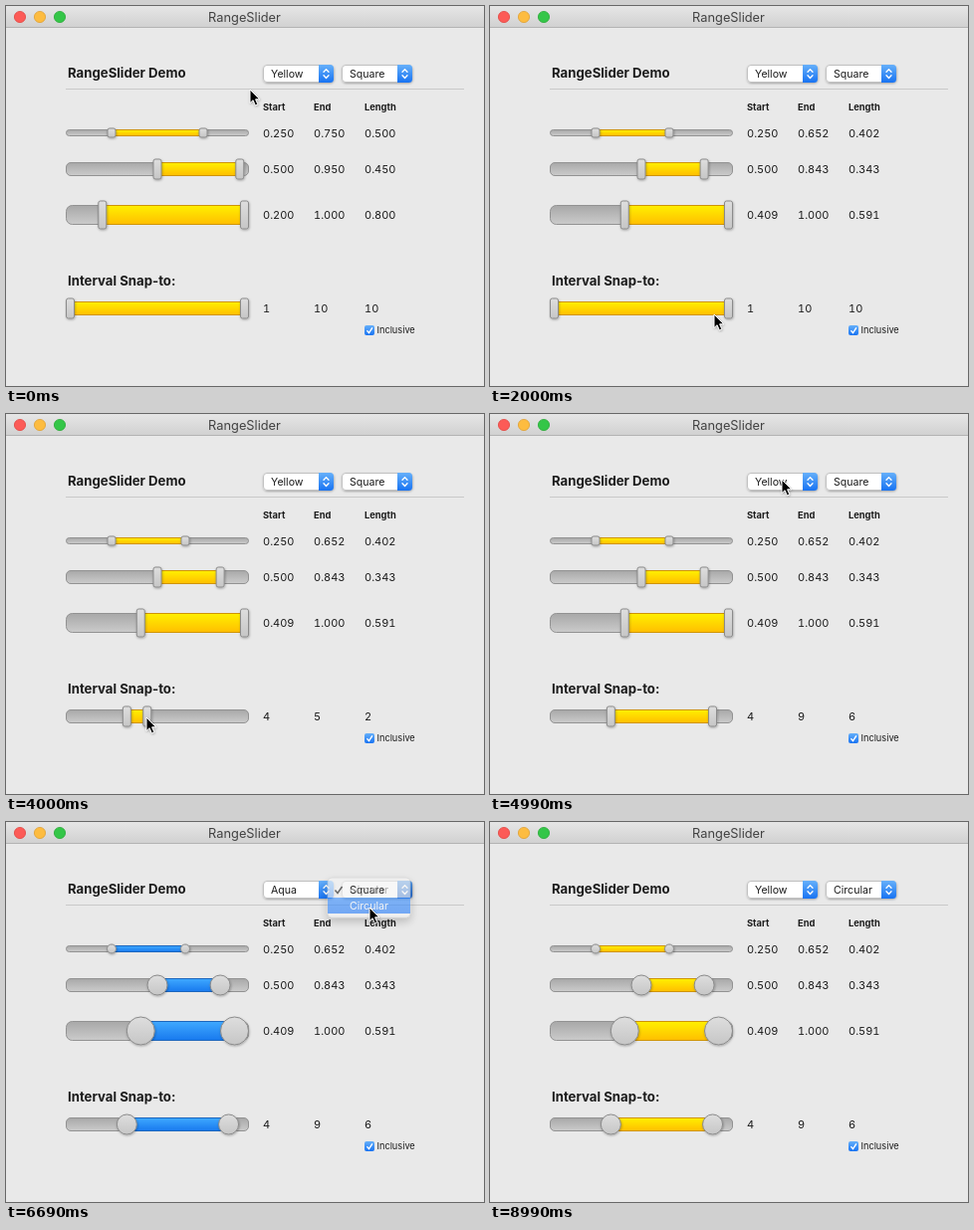
Write an HTML page that moves like this. It is 480 by 382 pixels and loops after 9090 ms.

```html
<!DOCTYPE html>
<html lang="en">
<head>
<meta charset="utf-8">
<title>RangeSlider</title>
<style>
html, body { margin: 0; width: 100%; height: 100%; overflow: hidden; background: #e9e9e9; }
svg { display: block; width: 480px; height: 382px; }
text { font: 11px Inter, "Open Sans", sans-serif; fill: #1c1c1c; }
.title { font-size: 12.8px; fill: #424242; text-anchor: middle; }
.head { font-size: 13.2px; font-weight: 700; }
.col { font-size: 9.3px; font-weight: 700; }
.num { font-variant-numeric: tabular-nums; }
.pick { font-size: 10.6px; }
.small { font-size: 9.2px; }
</style>
</head>
<body>
<svg id="stage" viewBox="0 0 480 382">
  <defs id="defs">
    <filter id="soft" x="-30%" y="-30%" width="160%" height="180%">
      <feDropShadow dx="0" dy="4" stdDeviation="4" flood-opacity=".3"/>
    </filter>
    <filter id="drop" x="-40%" y="-40%" width="180%" height="180%">
      <feDropShadow dx="0.5" dy="1" stdDeviation="0.8" flood-opacity=".3"/>
    </filter>
  </defs>
</svg>
<script>
const LOOP = 9090, STEP = 100;
const stage = document.getElementById('stage');

function el(tag, attrs, parent = stage, text) {
  const node = document.createElementNS('http://www.w3.org/2000/svg', tag);
  set(node, attrs);
  if (text !== undefined) node.textContent = text;
  parent.appendChild(node);
  return node;
}
function set(node, attrs) {
  for (const key in attrs) node.setAttribute(key, attrs[key]);
}
function box(x, y, width, height, fill, more = {}, parent = stage) {
  return el('rect', { x, y, width, height, fill, ...more }, parent);
}
function label(x, y, cls, text, parent = stage) {
  return el('text', { x, y, class: cls }, parent, text);
}
function gradient(id, top, bottom) {
  const g = el('linearGradient', { id, x1: 0, y1: 0, x2: 0, y2: 1 }, document.getElementById('defs'));
  el('stop', { offset: 0, 'stop-color': top }, g);
  el('stop', { offset: 1, 'stop-color': bottom }, g);
}

gradient('bar', '#e6e6e6', '#d1d1d1');
gradient('track', '#a8a8a8', '#cbcbcb');
gradient('Yellow', '#fff000', '#ffbe00');
gradient('Aqua', '#3fa9ff', '#1879ee');
gradient('knob', '#dedede', '#c6c6c6');
gradient('blue', '#66b0fa', '#1873f2');
gradient('pressed', '#4a93e2', '#1259c4');
gradient('hover', '#4596fd', '#3485fa');

// Window
box(0, 0, 480, 382, '#e9e9e9');
box(0, 0, 480, 21, 'url(#bar)');
box(0, 21, 480, 1, '#b3b3b3');
[['#fc5b57', '#e2443f'], ['#fdbc40', '#e0a032'], ['#34c648', '#27aa35']].forEach(([fill, stroke], i) =>
  el('circle', { cx: 14 + 20 * i, cy: 11, r: 5.6, fill, stroke, 'stroke-width': 0.8 }));
label(239.5, 15.5, 'title', 'RangeSlider');
label(62, 72, 'head', 'RangeSlider Demo');
label(62, 281, 'head', 'Interval Snap-to:');
box(60, 83, 400, 1, '#c9c9c9');
['Start', 'End', 'Length'].forEach((name, i) => label(258 + 51 * i, 105, 'col', name));

// Check box
box(360, 321, 10, 10, 'url(#blue)', { rx: 2 });
el('path', { d: 'M362.5 326.3l2 2.3 3.4-5.2', fill: 'none', stroke: '#fff', 'stroke-width': 1.4 });
label(372.5, 329.2, 'small', 'Inclusive');

// Pop-up buttons
function popup(x) {
  box(x + 0.5, 59.5, 70, 17, '#fff', { rx: 3.5, stroke: '#c2c2c2', filter: 'url(#drop)' });
  const end = `M${x + 56} 59h11.5a3.5 3.5 0 0 1 3.5 3.5v11a3.5 3.5 0 0 1-3.5 3.5h-11.5z`;
  const button = el('path', { d: end, fill: 'url(#blue)' });
  el('path', { d: `M${x + 61} 66.3l2.5-2.7 2.5 2.7M${x + 61} 69.8l2.5 2.7 2.5-2.7`,
    fill: 'none', stroke: '#fff', 'stroke-width': 1.3, 'stroke-linecap': 'round', 'stroke-linejoin': 'round' });
  return { button, text: label(x + 8, 72, 'pick', '') };
}
const colorPick = popup(258), shapePick = popup(337);

// Sliders
const LEFT = 60, WIDTH = 184;

function slider(mid, trackH, knobH, corner) {
  const y = mid - trackH / 2;
  box(LEFT + 0.5, y + 0.5, WIDTH - 1, trackH - 1, 'url(#track)', { rx: corner, stroke: '#929292' });
  const fill = box(0, y + 0.5, 1, trackH - 1, 'none');
  const knobs = [0, 1].map(() => el('rect', { fill: 'url(#knob)', stroke: '#8b8b8b', filter: 'url(#drop)' }));
  const nums = [0, 1, 2].map(i => label(258 + 51 * i, Math.round(mid) + 4, 'num', ''));

  return (start, end, texts, color, round) => {
    const w = round ? knobH : 9;
    const [a, b] = [start, end].map(v =>
      Math.min(LEFT + WIDTH - w / 2, Math.max(LEFT + w / 2, LEFT + v * WIDTH)));
    set(fill, { x: a, width: b - a, fill: `url(#${color})`, stroke: color === 'Yellow' ? '#cf9400' : '#1c66bd' });
    knobs.forEach((knob, i) => set(knob, {
      x: (i ? b : a) - w / 2 + 0.5, y: mid - knobH / 2 + 0.5,
      width: w - 1, height: knobH - 1, rx: round ? w / 2 : 2
    }));
    nums.forEach((num, i) => num.textContent = texts[i]);
  };
}
const thin = slider(127.5, 7, 10, 3);
const medium = slider(164, 14, 21, 4.5);
const thick = slider(210, 20, 29, 6);
const snap = slider(304, 14, 21, 4.5);

// Menu
const menu = el('g', {});
const panel = box(0, 0, 78, 40, '#f3f3f3', { rx: 4, stroke: '#c4c4c4', 'stroke-width': 0.6, filter: 'url(#soft)' }, menu);
const hover = box(0, 0, 78, 16, 'url(#hover)', {}, menu);
const items = [0, 1].map(i => label(22, 16 + 16 * i, 'pick', '', menu));
const tick = el('path', { fill: 'none', stroke: '#222', 'stroke-width': 1.4 }, menu);

const pointer = el('path', {
  d: 'M0 0V13.6L3.1 10.7 5.3 15.9 7.8 14.8 5.6 9.8H9.8Z',
  fill: '#000', stroke: '#fff', 'stroke-width': 1, 'stroke-linejoin': 'round', filter: 'url(#drop)'
});

// Motion: each row is [step, values...]
const CURSOR = [
  [0, 245, 84], [2, 198, 127], [3, 198, 127], [5, 180, 127], [7, 235, 163], [8, 235, 163],
  [10, 215, 163], [13, 97, 210], [17, 135, 210], [19, 218, 312], [20, 225, 310], [22, 239, 306],
  [27, 141, 306], [29, 90, 306], [31, 56, 305], [33, 64, 305], [37, 121, 305], [40, 141, 305],
  [45, 223, 306], [46, 223, 306], [50, 293, 66], [51, 293, 66], [54, 293, 84], [58, 293, 85],
  [61, 361, 68], [62, 361, 68], [65, 365, 86], [72, 365, 86], [74, 293, 72], [75, 293, 72],
  [79, 292, 54], [81, 292, 54], [84, 330, 28], [88, 330, 28], [89, 347, 27]
];
const THIN_END = [[3, 0.75], [5, 0.652]];
const MEDIUM_END = [[8, 0.95], [10, 0.843]];
const THICK_START = [[13, 0.2], [17, 0.409]];
const SNAP_START = [[33, 1], [37, 4]];
const SNAP_END = [[22, 10], [27, 5], [40, 5], [45, 9]];

const COLORS = ['Yellow', 'Aqua'], SHAPES = ['Square', 'Circular'];
const MENUS = [
  { from: 51, fade: 56, x: 244, w: 78, names: COLORS, on: 0 },
  { from: 62, fade: 67, x: 323, w: 83, names: SHAPES, on: 0 },
  { from: 75, fade: 81, x: 244, w: 78, names: COLORS, on: 1 }
];

function at(rows, k, col = 1) {
  const i = rows.findIndex(row => row[0] > k);
  if (i === 0) return rows[0][col];
  if (i < 0) return rows[rows.length - 1][col];
  const a = rows[i - 1], b = rows[i];
  const p = (k - a[0]) / (b[0] - a[0]);
  return a[col] + (b[col] - a[col]) * p * p * (3 - 2 * p);
}

function drawMenu(k, y) {
  const open = MENUS.find(m => k >= m.from && k < m.fade + 2);
  menu.style.display = open ? '' : 'none';
  set(colorPick.button, { fill: open && open.names === COLORS ? 'url(#pressed)' : 'url(#blue)' });
  set(shapePick.button, { fill: open && open.names === SHAPES ? 'url(#pressed)' : 'url(#blue)' });
  if (!open) return;
  const top = 56 - 16 * open.on;
  const active = y < top + 20 ? 0 : 1;
  set(menu, { transform: `translate(${open.x} ${top})`, opacity: k < open.fade ? 1 : k === open.fade ? 0.65 : 0.25 });
  set(panel, { width: open.w });
  set(hover, { width: open.w, y: 4 + 16 * active });
  items.forEach((item, i) => {
    item.textContent = open.names[i];
    item.style.fill = i === active ? '#fff' : '#1c1c1c';
  });
  set(tick, { d: `M7.5 ${12.5 + 16 * open.on}l2.5 3 4.5-6.5`, stroke: open.on === active ? '#fff' : '#222' });
}

function draw(k) {
  const color = COLORS[k >= 56 && k < 81 ? 1 : 0];
  const round = k >= 67;
  colorPick.text.textContent = color;
  shapePick.text.textContent = SHAPES[+round];

  const range = (move, a, b) => move(a, b, [a, b, b - a].map(v => v.toFixed(3)), color, round);
  range(thin, 0.25, at(THIN_END, k));
  range(medium, 0.5, at(MEDIUM_END, k));
  range(thick, at(THICK_START, k), 1);
  const a = Math.round(at(SNAP_START, k)), b = Math.round(at(SNAP_END, k));
  snap((a - 1) / 9, (b - 1) / 9, [a, b, b - a + 1], color, round);

  const x = at(CURSOR, k, 1), y = at(CURSOR, k, 2);
  set(pointer, { transform: `translate(${x} ${y})` });
  pointer.style.display = k < 90 ? '' : 'none';
  drawMenu(k, y);
}

const begin = performance.now();
let last = -1;
function tickFrame() {
  const t = (performance.now() - begin) % LOOP;
  const k = Math.floor((t + 10) / STEP);
  if (k !== last) draw(last = k);
  requestAnimationFrame(tickFrame);
}
tickFrame();
</script>
</body>
</html>
```
